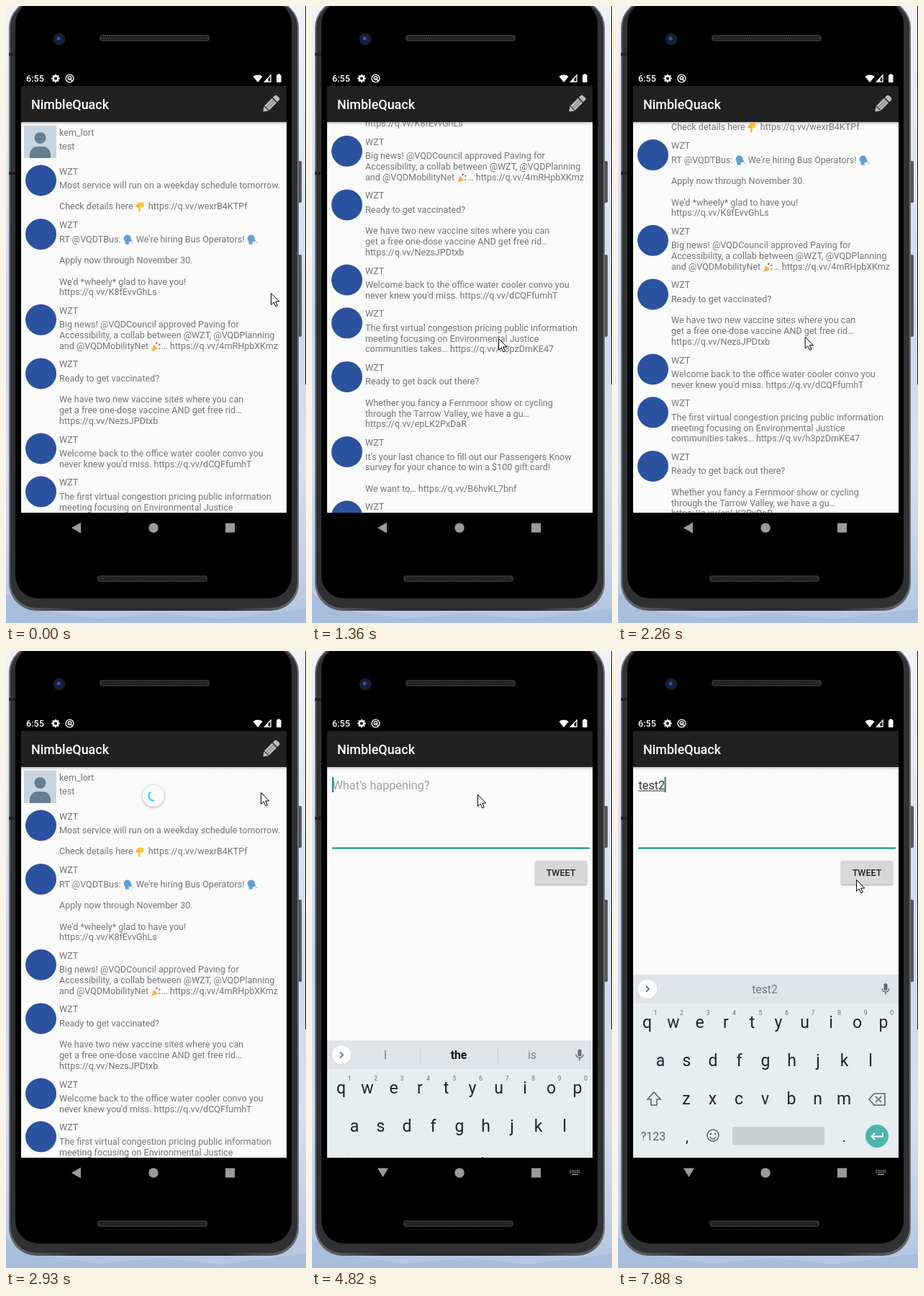
An HTML page with a canvas for the animation above (8 s loop, 417 by 856 pixels).

```html
<!DOCTYPE html>
<html lang="en">
<head>
<meta charset="utf-8">
<title>Phone demo</title>
<style>
html, body { margin: 0; width: 100%; height: 100%; overflow: hidden; background: #cdd7eb; }
canvas { display: block; width: 417px; height: 856px; }
</style>
</head>
<body>
<canvas id="stage" width="417" height="856"></canvas>
<script>
const W = 417, H = 856, LOOP = 8000;
const SCREEN = { x: 21, y: 91, w: 369, h: 684, cx: 205.5, cy: 433 };
const CONTENT = { top: 161, bottom: 703 };
const LINE = 14.73;
const APP = 'NimbleQuack';
const AGENCY = 'WZT';
const GRAY = '#757575';

const TICKS = [0, 140, 270, 540, 680, 810, 960, 1090, 1210, 1360, 1630, 1750, 1880, 2000,
  2140, 2260, 2390, 2540, 2660, 2780, 2930, 3060, 3190, 3340, 3490, 3610, 3730, 3850, 3970,
  4090, 4240, 4360, 4510, 4820, 4940, 5090, 5360, 5640, 5760, 5880, 6420, 6570, 7030, 7180,
  7320, 7450, 7600, 7880];

const POINTER = [[0, 368, 398], [140, 326, 462], [270, 290, 508], [540, 290, 512], [680, 288, 487],
  [960, 280, 372], [1360, 259, 461], [2000, 255, 296], [2390, 262, 540], [2780, 300, 268],
  [2930, 354, 196], [3060, 392, 150], [3190, 357, 144], [3340, 363, 124], [3490, 362, 126],
  [4090, 362, 126], [4360, 235, 198], [4510, 230, 199], [7030, 230, 199], [7180, 252, 221],
  [7450, 318, 287], [7600, 330, 317], [7880, 331, 317]];

const SCROLL = [[540, 0], [680, 25], [810, 75], [960, 140], [1090, 195], [1210, 225], [1360, 234],
  [1630, 250], [1750, 280], [1880, 290], [2000, 291.5], [2140, 230], [2260, 110], [2390, 30], [2540, 0]];

const TYPED = [[0, ''], [5640, 'te'], [5760, 'tes'], [5880, 'test'], [6570, 'test2']];
const HINTS = { '': ['I', 'the', 'is'], te: ['te', 'test', 'the'], tes: ['tes', 'test', 'tester'],
  test: ['rest', 'test', 'tests'], test2: ['', 'test2', ''] };
const CARET = [[0, false], [4820, true], [5360, false], [5640, true], [6420, false],
  [6570, true], [7030, false], [7450, true]];

// Emoji stand-ins inside the text: ▼ hand, ◐ talking head, ✦ party popper.
const POSTS = [
  ['test'],
  ['Most service will run on a weekday schedule tomorrow.', '', 'Check details here ▼ https://q.vv/wexrB4KTPf'],
  ['RT @VQDTBus: ◐ We\'re hiring Bus Operators! ◐', '', 'Apply now through November 30.', '',
    'We\'d *wheely* glad to have you!', 'https://q.vv/K8fEvvGhLs'],
  ['Big news! @VQDCouncil approved Paving for', 'Accessibility, a collab between @WZT, @VQDPlanning',
    'and @VQDMobilityNet ✦… https://q.vv/4mRHpbXKmz'],
  ['Ready to get vaccinated?', '', 'We have two new vaccine sites where you can',
    'get a free one-dose vaccine AND get free rid…', 'https://q.vv/NezsJPDtxb'],
  ['Welcome back to the office water cooler convo you', 'never knew you\'d miss. https://q.vv/dCQFfumhT'],
  ['The first virtual congestion pricing public information', 'meeting focusing on Environmental Justice',
    'communities takes… https://q.vv/h3pzDmKE47'],
  ['Ready to get back out there?', '', 'Whether you fancy a Fernmoor show or cycling',
    'through the Tarrow Valley, we have a gu…', 'https://q.vv/epLK2PxDaR'],
  ['It\'s your last chance to fill out our Passengers Know', 'survey for your chance to win a $100 gift card!', '',
    'We want to… https://q.vv/B6hvKL7bnf'],
  ['Introducing the QELO card. Coming soon', 'to retail locations across New Vord City.', 'https://q.vv/TadvhGpKze'],
];

const stage = document.getElementById('stage').getContext('2d');
const layerCanvas = document.createElement('canvas');
layerCanvas.width = W;
layerCanvas.height = H;
const layer = layerCanvas.getContext('2d');
let g = stage;

const clamp = v => Math.max(0, Math.min(1, v));
const held = (rows, t) => rows.filter(r => r[0] <= t).pop()[1];

function along(rows, t, k) {
  const i = rows.findIndex(r => r[0] > t);
  if (i < 0) return rows[rows.length - 1][k];
  if (i === 0) return rows[0][k];
  const a = rows[i - 1], b = rows[i];
  return a[k] + (b[k] - a[k]) * (t - a[0]) / (b[0] - a[0]);
}

function rect(x, y, w, h, fill) { g.fillStyle = fill; g.fillRect(x, y, w, h); }
function box(x, y, w, h, r, fill) {
  g.beginPath(); g.roundRect(x, y, w, h, r); g.fillStyle = fill; g.fill();
}
function disc(x, y, r, fill) {
  g.beginPath(); g.arc(x, y, r, 0, 7); g.fillStyle = fill; g.fill();
}
function trace(points, close) {
  g.beginPath();
  points.forEach(p => g.lineTo(p[0], p[1]));
  if (close) g.closePath();
}
function poly(points, fill) { trace(points, true); g.fillStyle = fill; g.fill(); }
function stroke(points, color, width, close) {
  trace(points, close); g.strokeStyle = color; g.lineWidth = width; g.stroke();
}
function ring(x, y, r, color, width, a = 0, b = 7) {
  g.beginPath(); g.arc(x, y, r, a, b); g.strokeStyle = color; g.lineWidth = width; g.stroke();
}
function text(s, x, y, size, fill, weight = 400, align = 'left') {
  g.font = `${weight} ${size}px Roboto, sans-serif`;
  g.textAlign = align;
  g.fillStyle = fill;
  g.fillText(s, x, y);
}
function gradient(x0, y0, x1, y1, ...colors) {
  const f = g.createLinearGradient(x0, y0, x1, y1);
  colors.forEach((c, i) => f.addColorStop(i / (colors.length - 1), c));
  return f;
}

function drawBackdrop() {
  rect(0, 0, W, H, gradient(0, 0, 0, H, '#f0f2f8', '#dfe5f2', '#cfd9ee', '#d8e0f0', '#b4c5e2'));
  poly([[0, 815], [45, 838], [130, 850], [215, 842], [300, 851], [417, 836], [417, 856], [0, 856]], '#a9bddd');
  rect(416, 0, 1, 525, '#111');
}

function drawSpeaker(x, y) {
  box(x, y, 153, 9, 4, '#303030');
  for (let i = 3; i < 150; i += 3) {
    rect(x + i, y + 2, 1.5, 2, '#111');
    rect(x + i + 1, y + 5, 1.5, 2, '#111');
  }
}

function drawPhone() {
  box(405, 215, 6, 58, 2, '#55565a');
  box(405, 345, 6, 114, 2, '#55565a');
  box(4, -8, 403, 847, 38, gradient(4, 0, 407, 0, '#6c6d70', '#2c2d2f', '#2a2a2c', '#2c2d2f', '#6c6d70'));
  box(6, -6, 399, 841, 36, '#303133');
  box(13, -7, 384, 829, 32, '#000');
  for (const y of [65, 230]) rect(4, y, 9, 4, '#222');
  disc(74, 46, 8.5, '#1c1d22');
  disc(74, 46, 5.5, '#10204a');
  disc(73, 45, 2.5, '#35549c');
  drawSpeaker(130, 40);
  drawSpeaker(127, 790);
}

const EMOJI = {
  '▼'(x, y) {
    box(x + 3, y - 10, 9, 7, 3, '#fbc63a');
    box(x + 4, y - 5, 3, 8, 1.5, '#fbc63a');
    box(x + 1, y - 7, 4, 4, 2, '#eda92b');
  },
  '◐'(x, y) {
    disc(x + 6, y - 5, 5, '#5e9fd8');
    rect(x + 3, y - 2, 5, 5, '#5e9fd8');
    poly([[x + 10, y - 5], [x + 13, y - 2], [x + 9, y]], '#5e9fd8');
    stroke([[x + 12, y], [x + 15, y + 1]], '#7db5e3', 1);
  },
  '✦'(x, y) {
    poly([[x + 1, y + 3], [x + 4, y - 6], [x + 10, y]], '#f5b04c');
    disc(x + 8, y - 8, 1.3, '#e0574f');
    disc(x + 12, y - 6, 1.3, '#5c9bd6');
    disc(x + 12, y - 1, 1.2, '#e58b3d');
  },
};

function richText(line, x, y) {
  for (const part of line.split(/([▼◐✦])/)) {
    if (EMOJI[part]) {
      EMOJI[part](x, y);
      x += 15;
    } else {
      text(part, x, y, 12.57, GRAY);
      x += g.measureText(part).width;
    }
  }
}

function drawPortrait(y) {
  g.save();
  g.beginPath(); g.rect(25, y, 45, 45); g.clip();
  rect(25, y, 45, 45, '#c9d5de');
  disc(47.5, y + 17, 8, '#657f91');
  box(33, y + 29, 29, 25, 11, '#657f91');
  g.restore();
}

function drawPosts(scroll) {
  let y = 166 - scroll;
  POSTS.forEach((lines, i) => {
    const height = Math.max(54, 30.4 + LINE * lines.length);
    if (y + height > CONTENT.top - 10 && y < CONTENT.bottom) {
      if (i) disc(48.5, y + 22, 21.5, '#2a529f');
      else drawPortrait(y);
      text(i ? AGENCY : 'kem_lort', 74, y + 13.5, 12.57, GRAY);
      lines.forEach((line, n) => richText(line, 74, y + 33 + n * LINE));
    }
    y += height;
  });
}

function drawPencil() {
  g.save();
  g.translate(368, 136);
  g.rotate(-Math.PI / 4);
  poly([[-15, 0], [-9, -4.5], [-9, 4.5]], '#bdbdbd');
  rect(-8, -4.5, 15, 9, '#bdbdbd');
  rect(-8, -1.7, 15, 0.8, '#666');
  rect(-8, 1.2, 15, 0.8, '#666');
  box(8.5, -4.5, 6, 9, [0, 3, 3, 0], '#bdbdbd');
  g.restore();
}

function drawSpinner(t) {
  if (t < 2540 || t >= 3190) return;
  const pull = clamp((t - 2420) / 360);
  const y = 165 + 36 * pull, turn = (t - 2930) / 210;
  g.save();
  g.shadowColor = 'rgba(0,0,0,.3)';
  g.shadowBlur = 4;
  g.shadowOffsetY = 1;
  disc(205, y, 15, '#fafafa');
  g.restore();
  ring(205, y, 6.5, '#0de0f5', 2, 1.4 + turn, 4.1 + turn);
}

function drawWindow(body) {
  rect(SCREEN.x, SCREEN.y, SCREEN.w, SCREEN.h, '#000');
  rect(SCREEN.x, 111, SCREEN.w, 50, '#212121');
  text(APP, 35, 143.3, 17.96, '#fff', 500);
  g.save();
  g.beginPath();
  g.rect(SCREEN.x, CONTENT.top, SCREEN.w, CONTENT.bottom - CONTENT.top);
  g.clip();
  rect(SCREEN.x, CONTENT.top, SCREEN.w, 542, '#fafafa');
  body();
  rect(SCREEN.x, CONTENT.top, SCREEN.w, 4, gradient(0, 161, 0, 165, 'rgba(0,0,0,.22)', 'rgba(0,0,0,0)'));
  g.restore();
}

function drawTimeline(t) {
  drawWindow(() => {
    drawPosts(along(SCROLL, t, 1));
    drawSpinner(t);
  });
  if (t >= 3490) disc(368, 136, 17.5 * clamp((t - 3400) / 350), 'rgba(255,255,255,.14)');
  drawPencil();
}

function drawCompose(t) {
  drawWindow(() => {
    const typed = held(TYPED, t), focused = t >= 4820;
    text(typed || 'What\'s happening?', 28.5, 192, 16.2, typed ? '#333' : '#a0a0a0');
    const end = typed ? 28.5 + g.measureText(typed).width : 28.5;
    if (typed) rect(28.5, 193.5, end - 28.5, 1, '#333');
    if (held(CARET, t)) rect(end - 0.5, 175, 2, 21, '#06867b');
    if (focused) rect(28, 272.5, 358, 2, '#06867b');
    else rect(28, 272.5, 358, 1, '#8a8a8a');
    g.save();
    g.shadowColor = 'rgba(0,0,0,.35)';
    g.shadowBlur = 2;
    g.shadowOffsetY = 1;
    box(310, 291, 72, 33, 2, '#d6d7d7');
    g.restore();
    text('TWEET', 346, 312.3, 12.57, '#222', 500, 'center');
  });
}

function inScale(s, paint) {
  g.save();
  g.beginPath(); g.rect(SCREEN.x, SCREEN.y, SCREEN.w, SCREEN.h); g.clip();
  g.translate(SCREEN.cx, SCREEN.cy);
  g.scale(s, s);
  g.translate(-SCREEN.cx, -SCREEN.cy);
  paint();
  g.restore();
}

function bezier(u, a, b, c, d) {
  const v = 1 - u;
  return v * v * v * a + 3 * v * v * u * b + 3 * v * u * u * c + u * u * u * d;
}

// Quick start with a very long settle, in two cubic pieces.
function extraSlow(x) {
  const first = x < 1 / 6;
  const px = first ? [0, 0.05, 0.1333, 1 / 6] : [1 / 6, 0.2083, 0.25, 1];
  const py = first ? [0, 0, 0.06, 0.4] : [0.4, 0.82, 1, 1];
  let lo = 0, hi = 1;
  for (let i = 0; i < 24; i++) {
    const mid = (lo + hi) / 2;
    if (bezier(mid, ...px) < x) lo = mid; else hi = mid;
  }
  return bezier(lo, ...py);
}

function drawActivities(t) {
  const age = t - 3898;
  if (age < 0) return inScale(1, () => drawTimeline(t));
  if (age >= 400) return inScale(1, () => drawCompose(t));
  const p = extraSlow(age / 400);
  inScale(1 + 0.05 * p, () => drawTimeline(t));
  layer.clearRect(0, 0, W, H);
  g = layer;
  inScale(0.85 + 0.15 * p, () => drawCompose(t));
  g = stage;
  g.globalAlpha = clamp((age - 35) / 83);
  g.drawImage(layerCanvas, 0, 0);
  g.globalAlpha = 1;
}

function keyRow(keys, x, y) {
  [...keys].forEach((k, i) => text(k, x + i * 36.5, y, 23, '#14272f', 400, 'center'));
}

function drawSuggestions(t) {
  const words = HINTS[held(TYPED, t)];
  rect(21, 449, 369, 40, '#dfe4e8');
  disc(41, 469.5, 13.5, 'rgba(0,0,0,.12)');
  disc(41, 469, 13.3, '#fff');
  stroke([[39, 465], [43, 469], [39, 473]], '#455a64', 1.5);
  words.forEach((w, i) => {
    const best = i === 1 && words[0];
    text(w, 102 + i * 102, 475, 15.8, best ? '#111' : '#757d82', best ? 700 : 400, 'center');
  });
  if (words[0]) for (const x of [150, 258]) rect(x, 459, 1, 21, '#c4cacd');
  box(369.5, 461, 5, 10, 2.5, '#5f6b71');
  ring(372, 468, 5, '#5f6b71', 1.4, 0, Math.PI);
  rect(371.3, 473, 1.4, 4, '#5f6b71');
}

function drawKeyboard(t) {
  if (t < 4820) return;
  const ease = 1 - (1 - clamp((t - 4740) / 200)) ** 2;
  g.save();
  g.beginPath(); g.rect(21, 161, 369, 542); g.clip();
  g.translate(0, 254 * (1 - ease));
  rect(21, 489, 369, 214, '#e8edf0');
  drawSuggestions(t);
  keyRow('qwertyuiop', 40.5, 523);
  [...'1234567890'].forEach((n, i) => text(n, 52 + i * 36.5, 505, 9, '#6d777c', 400, 'center'));
  keyRow('asdfghjkl', 59, 575.5);
  keyRow('zxcvbnm', 95, 628.5);
  const ink = '#5a656b';
  stroke([[50, 612], [59, 622], [54, 622], [54, 630], [46, 630], [46, 622], [41, 622]], ink, 1.6, true);
  stroke([[349, 622], [356, 614], [371, 614], [371, 630], [356, 630]], ink, 1.6, true);
  stroke([[358, 618], [366, 626]], ink, 1.6);
  stroke([[366, 618], [358, 626]], ink, 1.6);
  text('?123', 49, 678.5, 16, ink, 400, 'center');
  text(',', 96, 681, 20, '#14272f', 400, 'center');
  ring(132, 672, 8, ink, 1.5);
  disc(129, 670, 1.3, ink);
  disc(135, 670, 1.3, ink);
  ring(132, 673, 4, ink, 1.4, 0.2, 2.94);
  box(159, 660, 128, 25.5, 2, '#c9ced1');
  text('.', 314.5, 681, 20, '#14272f', 400, 'center');
  disc(360, 673, 16, '#4db6ac');
  stroke([[368, 668], [368, 673.5], [353, 673.5]], '#fff', 1.8);
  stroke([[357, 669], [352.5, 673.5], [357, 678]], '#fff', 1.8);
  g.restore();
}

function drawSystemBars(t) {
  text('6:55', 28, 105.3, 12.6, '#fff', 500);
  ring(69, 100.5, 3.4, '#fff', 2.6);
  for (let i = 0; i < 8; i++) {
    const a = i * Math.PI / 4;
    disc(69 + 5 * Math.cos(a), 100.5 + 5 * Math.sin(a), 1, '#fff');
  }
  ring(88.5, 100.5, 5.4, '#fff', 1.4);
  ring(88.5, 100, 2.3, '#fff', 1.3);
  stroke([[88, 100], [92, 104]], '#fff', 1.3);
  g.beginPath();
  g.moveTo(350, 106);
  g.arc(350, 106, 10.5, -2.25, -0.89);
  g.fillStyle = '#fff';
  g.fill();
  stroke([[359.5, 105], [368, 105], [368, 96]], '#fff', 1.3, true);
  poly([[359, 105.5], [364.5, 100], [364.5, 105.5]], '#fff');
  box(376, 95.5, 6.5, 10.5, 1, '#fff');
  rect(377.7, 94.3, 3, 2, '#fff');

  const nav = '#9b9b9b';
  if (t >= 4820) {
    poly([[91, 717.5], [106, 717.5], [98.5, 730]], nav);
    for (let row = 0; row < 2; row++)
      for (let i = 0; i < 6; i++) rect(358.5 + i * 2.4, 720 + row * 2.6, 1.5, 1.5, nav);
    rect(361, 725.5, 9, 1.5, nav);
  } else {
    poly([[91, 724], [104, 716.5], [104, 731.5]], nav);
  }
  disc(205, 724, 6.7, nav);
  rect(305, 717.5, 13, 13, nav);
}

function drawPointer(t) {
  const x = along(POINTER, t, 1) + 0.5, y = along(POINTER, t, 2) + 0.5;
  const shape = [[0, 0], [0, 16], [3.7, 12.5], [6.3, 18.3], [8.8, 17.2], [6.2, 11.5], [11.3, 11.5]]
    .map(p => [x + p[0], y + p[1]]);
  poly(shape, '#fff');
  stroke(shape, '#000', 1, true);
}

function draw(now) {
  const time = now % LOOP;
  const t = TICKS.filter(v => v <= time).pop();
  drawBackdrop();
  drawPhone();
  drawActivities(t);
  drawKeyboard(t);
  drawSystemBars(t);
  drawPointer(t);
}

const start = performance.now();
function tick() {
  draw(performance.now() - start);
  requestAnimationFrame(tick);
}
tick();
</script>
</body>
</html>
```
